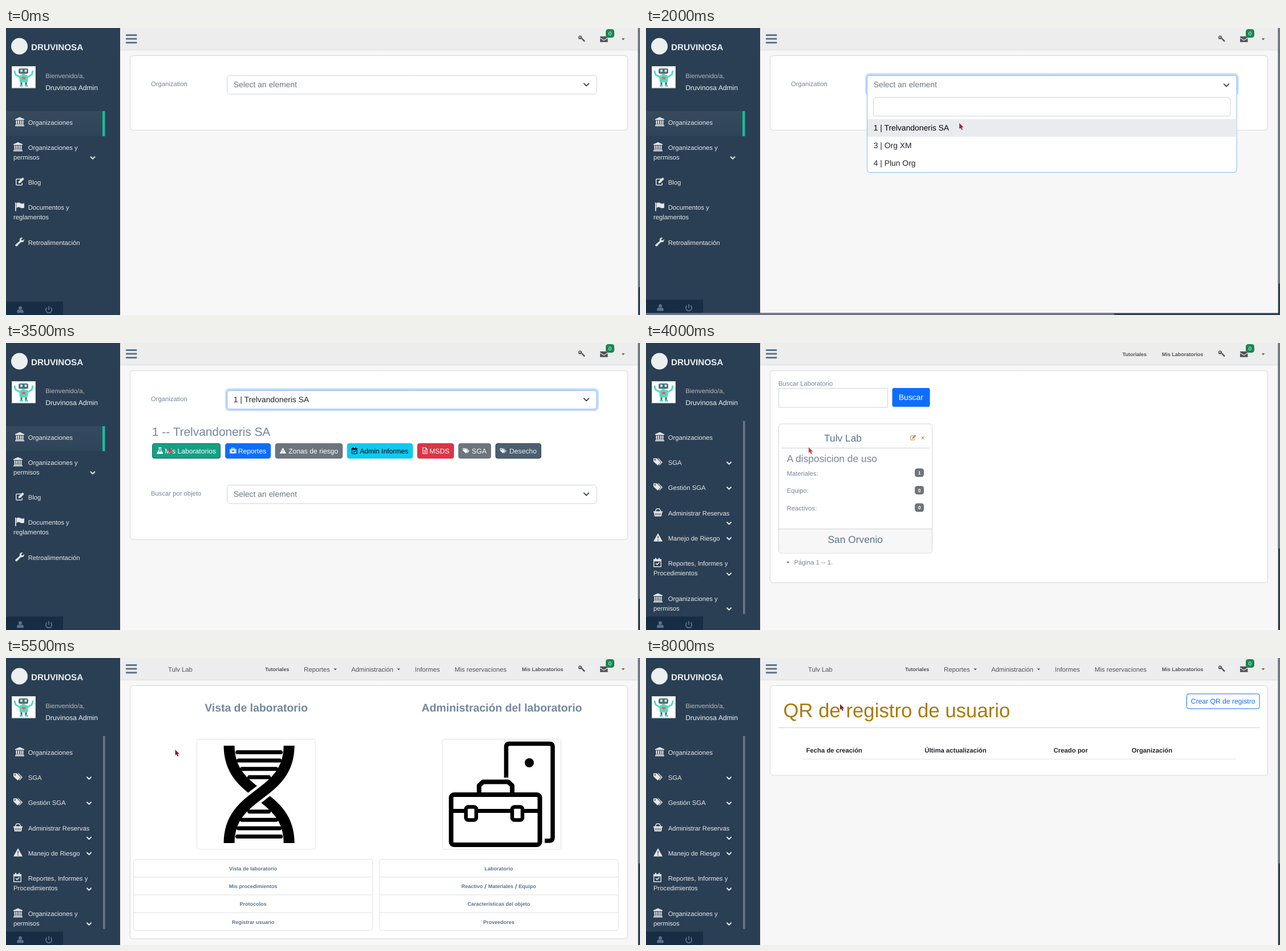
An HTML page with a canvas for the animation above (9 s loop, 1111 px wide and 504 px high).

```html
<!DOCTYPE html>
<html lang="es">
<head>
<meta charset="utf-8">
<title>Panel de laboratorio</title>
<style>
  html, body { margin: 0; width: 100%; height: 100%; overflow: hidden; background: #2a3f54; }
  canvas { display: block; }
</style>
</head>
<body>
<canvas id="stage" width="1111" height="504"></canvas>
<script>
const W = 1111, H = 504, LOOP = 9000;
const ctx = document.getElementById('stage').getContext('2d');

const NAVY = '#2a3f54', SLATE = '#73879c', LINK = '#5a738e', HOVER = '#0a58ca';
const DARK = '#515356', INK = '#212529', LINE = '#d4d4d4', FIELD = '#ced4da';
const BLUE = '#0d6efd', GREY = '#6c757d', PALE = '#e7e7e7', THUMB = '#717486';

// Text sizes in use
const TINY = 9, SMALL = 11.28, MEDIUM = 12.15, BASE = 13.89, LARGE = 17.36;

const BRAND = 'DRUVINOSA', USER = 'Druvinosa Admin', LAB = 'Tulv Lab', PLACE = 'San Orvenio';
const ORGS = ['1 | Trelvandoneris SA', '3 | Org XM', '4 | Plun Org'];
const ORG_TITLE = '1 -- Trelvandoneris SA';

// Icons are drawn in a 16 x 16 box
const icons = {
  bank: 'M8 0L16 3.5V5H0V3.5Z M1.5 6h2.2v6H1.5z M5 6h2.2v6H5z M8.8 6H11v6H8.8z M12.3 6h2.2v6h-2.2z M1 12.5h14v1.2H1z M0 14.3h16V16H0z',
  edit: 'M11 3H3Q1 3 1 5V13Q1 15 3 15H11Q13 15 13 13V10.5H11.5V13.5H2.5V4.5H10Z M6 8L13 1L15.8 3.8L8.8 10.8L5.5 11.3Z',
  flag: 'M0 1h1.8v15H0z M2.5 2Q6 0 9 2T16 2V10Q12 12 9 10T2.5 10.5Z',
  wrench: 'M.5 13L8 6.5Q7 3 9.5 1.2Q11 .2 13.5 .8L10.8 3.2L11.3 5.2L13.3 5.7L15.8 3Q16.3 6 14.5 7.8Q12.5 9.3 10 8.6L3.5 15.5Q2 16.5 .8 15.3T.5 13Z',
  tags: 'M0 2H6L13 9L7.5 14.5L0 7.5Z M7.7 2H9.2L16 9L10.5 14.5L9.7 13.7L14 9Z M2.8 3.4a1.3 1.3 0 1 0 .01 0Z',
  basket: 'M0 6H16V8H15L14 15H2L1 8H0Z M3.8 9h1.4v4H3.8z M7.3 9h1.4v4H7.3z M10.8 9h1.4v4h-1.4z M2.5 6L5 1H11L13.5 6H12L10.2 2.4H5.8L4 6Z',
  warn: 'M8 .5L16 15H0Z M7.2 5.5H8.8L8.5 10.5H7.5Z M7.2 11.7h1.6v1.6H7.2z',
  calendar: 'M0 2H14V16H0Z M1.4 6V14.6H12.6V6Z M3 0h2v2H3z M9 0h2v2H9z M3.5 10L4.7 8.8L6.3 10.4L9.8 7L11 8.2L6.3 12.8Z',
  user: 'M8 .5a3.7 4 0 1 0 .01 0Z M1 15V12Q1 8.5 4.5 8Q8 10.5 11.5 8Q15 8.5 15 12V15Z',
  key: 'M5 1a4 4 0 1 0 .01 0Z M4.5 3a1.5 1.5 0 1 0 .01 0Z M8 6.5L9.3 5.8L15.5 12L15 14L13.5 14.5L12.5 12.8L11 13V11L9 10.5Z',
  mail: 'M0 2H16V4L8 9.5L0 4Z M0 6L8 11L16 6V14H0Z',
  flask: 'M4.5 0h7v1.6h-1V6L15.5 14Q16 16 14 16H2Q0 16 .5 14L5.5 6V1.6h-1z M7 1.6V6.5L4.8 10H11.2L9 6.5V1.6z',
  kit: 'M0 4H4V2Q4 1 5 1H11Q12 1 12 2V4H16V15H0Z M5.5 4H10.5V2.5H5.5Z M7 6.5h2v2h2v2H9v2H7v-2H5v-2h2z M2.2 4v11h.9V4z M12.9 4v11h.9V4z',
  doc: 'M2 0H10L14 4V16H2Z M3.4 1.4V14.6H12.6V5H9V1.4Z M5 7h6v1.2H5z M5 9.5h6v1.2H5z M5 12h6v1.2H5z',
  cross: 'M3 1L8 6L13 1L15 3L10 8L15 13L13 15L8 10L3 15L1 13L6 8L1 3Z'
};
for (const name in icons) icons[name] = new Path2D(icons[name]);
const arrow = new Path2D('M0 0V10L2.2 8.2L4.2 12L6 11L4.2 7.5H7.5Z');

function text(str, x, y, size, color, { bold = false, align = 'left' } = {}) {
  ctx.font = `${bold ? 'bold ' : ''}${size}px "Liberation Sans", Arial, sans-serif`;
  ctx.textAlign = align;
  ctx.fillStyle = color;
  ctx.fillText(str, x, y);
}

function rect(x, y, w, h, color) {
  ctx.fillStyle = color;
  ctx.fillRect(x, y, w, h);
}

function box(x, y, w, h, r, fill, border, width = 1) {
  ctx.beginPath();
  ctx.roundRect(x, y, w, h, r);
  if (fill) { ctx.fillStyle = fill; ctx.fill(); }
  if (border) { ctx.strokeStyle = border; ctx.lineWidth = width; ctx.stroke(); }
}

function disc(x, y, r, color) {
  ctx.fillStyle = color;
  ctx.beginPath();
  ctx.arc(x, y, r, 0, Math.PI * 2);
  ctx.fill();
}

function stroke(d, color, width, cap = 'butt') {
  ctx.strokeStyle = color;
  ctx.lineWidth = width;
  ctx.lineCap = cap;
  ctx.lineJoin = 'round';
  ctx.stroke(new Path2D(d));
}

function icon(name, x, y, size, color) {
  ctx.save();
  ctx.translate(x, y);
  ctx.scale(size / 16, size / 16);
  ctx.fillStyle = color;
  ctx.fill(icons[name], 'evenodd');
  ctx.restore();
}

const chevron = (x, y, r, color, width) =>
  stroke(`M${x - r} ${y - r / 2}L${x} ${y + r / 2}L${x + r} ${y - r / 2}`, color, width, 'round');

const caret = (x, y) => {
  ctx.fillStyle = DARK;
  ctx.fill(new Path2D(`M${x - 2.8} ${y}h5.6l-2.8 3z`));
};

const panel = bottom => box(217.5, 48.5, 872, bottom - 48.5, 5, '#fff', LINE);

function robot() {
  const teal = '#4fdcbf', steel = '#4c7078';
  rect(10, 67, 42, 38.5, '#fff');
  stroke('M10.5 67.5h41v37.5h-41z', '#c9d3d8', 1);
  stroke('M24 86L17 82L15 76M38 86L45 82L47 76', teal, 3, 'round');
  stroke('M27 95V101M35 95V101', steel, 3);
  rect(24, 100, 5.5, 3, teal);
  rect(33, 100, 5.5, 3, teal);
  box(22, 71, 17, 9.5, 3, steel);
  disc(27, 75, 2.2, '#bff5e8');
  disc(34.5, 75, 2.2, '#bff5e8');
  rect(28, 80.5, 5, 2.5, '#9ab');
  box(23.5, 82.5, 15, 13, 3, teal);
  box(28, 86, 6, 4, 1, '#e8605a');
}

const homeMenu = [
  ['bank', 16, 166, 'Organizaciones'],
  ['bank', 13, 210, 'Organizaciones y', 'permisos', 152, 228],
  ['edit', 16, 271, 'Blog'],
  ['flag', 16, 315, 'Documentos y', 'reglamentos'],
  ['wrench', 16, 377, 'Retroalimentación']
];
const labMenu = [
  ['bank', 16, 166, 'Organizaciones'],
  ['tags', 13, 210, 'SGA', '', 145.5, 211],
  ['tags', 13, 254, 'Gestión SGA', '', 145.5, 255],
  ['basket', 13, 299, 'Administrar Reservas', '', 145.5, 316.5],
  ['warn', 13, 343, 'Manejo de Riesgo', '', 145.5, 343.5],
  ['calendar', 13, 387, 'Reportes, Informes y', 'Procedimientos', 145.5, 406],
  ['bank', 13, 449, 'Organizaciones y', 'permisos', 145.5, 467]
];

function sidebar(inLab, footY) {
  rect(0, 0, 200, H, NAVY);
  disc(23.5, 32, 14.5, '#ecf0f1');
  text(BRAND, 44, 39, 15.2, '#ecf0f1', { bold: true });
  robot();
  text('Bienvenido/a,', 69.3, 88, SMALL, '#bab8b8');
  text(USER, 69.3, 108.5, MEDIUM, '#ecf0f1');

  if (inLab) {
    rect(170, 137, 3.6, 339, THUMB);
  } else {
    const g = ctx.createLinearGradient(0, 146, 0, 190);
    g.addColorStop(0, '#364a5c');
    g.addColorStop(1, '#2e4459');
    rect(0, 146, 173.5, 44, g);
    rect(169, 146, 4.5, 44, '#1abb9c');
  }
  for (const [name, x, y, label, second, cx, cy] of inLab ? labMenu : homeMenu) {
    icon(name, x, y - 9.5, 16, PALE);
    text(label, 38.7, y + 4, SMALL, PALE);
    if (second) text(second, 13, y + 21, SMALL, PALE);
    if (cx) chevron(cx, cy, 3.5, PALE, 2);
  }

  rect(0, footY, 100, H - footY, '#172d44');
  icon('user', 18.5, footY + 7.5, 13, LINK);
  const py = footY + 14.5;
  stroke(`M71.7 ${py - 4}A5.2 5.2 0 1 0 78.3 ${py - 4}M75 ${py - 6.5}V${py}`, LINK, 1.8);
}

function topbar(screen) {
  rect(200, 0, 908, 39, '#ededed');
  rect(200, 38.2, 908, 1, '#d9dee4');
  for (let i = 0; i < 3; i++) box(210, 11 + i * 6.6, 19.5, 3, 1, LINK);
  icon('key', 1002, 12.5, 13, DARK);
  icon('mail', 1041, 13, 13.5, DARK);
  box(1051, 2, 15, 15, 4.5, '#198754');
  text('0', 1058.5, 12.8, 9.5, '#fff', { align: 'center' });
  caret(1081.5, 18.3);
  if (screen === 'home') return;

  const inLab = screen !== 'labs';
  text('Tutoriales', inLab ? 454 : 835, 23.3, TINY, DARK, { bold: true });
  text('Mis Laboratorios', 904, 23.3, TINY, DARK, { bold: true });
  if (!inLab) return;
  const items = [[LAB, 284], ['Reportes', 522], ['Administración', 605], ['Informes', 716.5], ['Mis reservaciones', 786.3]];
  for (const [label, x] of items) text(label, x, 23.5, SMALL, DARK);
  caret(577, 18.5);
  caret(688, 18.5);
}

function select(y, value, { chosen = false, focus = false, open = false } = {}) {
  if (focus) box(385.8, y - 1.8, 651, 36.5, 6, null, 'rgba(13,110,253,.25)', 3.5);
  box(387.5, y + .5, 647.5, 32.5, 5, '#fff', focus ? '#86b7fe' : FIELD);
  text(value, 398.7, y + 21.3, BASE, chosen ? INK : GREY);
  chevron(1017, y + (open ? 17.5 : 16.5), 4.3, '#343a40', 1.7);
}

function dropdown() {
  box(387.5, 113, 647.5, 140.5, [0, 0, 4, 4], '#fff', '#86b7fe');
  rect(388, 111, 646.5, 6, '#fff');
  box(398.5, 122, 625.5, 32.5, 4, '#fff', FIELD);
  rect(388, 160, 646.5, 31, '#e9ecef');
  ORGS.forEach((org, i) => text(org, 398.7, 179.8 + i * 31.2, BASE, i ? INK : '#000'));
}

const actions = [
  ['flask', 'Mis Laboratorios', 256, 376, '#26b99a', '#169f85'],
  ['kit', 'Reportes', 384, 464, BLUE, BLUE],
  ['warn', 'Zonas de riesgo', 471.5, 590, GREY, GREY],
  ['calendar', 'Admin Informes', 597.5, 713, '#0dcaf0', '#0dcaf0', '#000'],
  ['doc', 'MSDS', 720.5, 785, '#dc3545', '#dc3545'],
  ['tags', 'SGA', 792.5, 850, GREY, GREY],
  ['tags', 'Desecho', 857.5, 938, '#4b5f71', '#364b5f', '#e9edef']
];

function home(t) {
  const chosen = t >= 2500, open = t >= 1000 && !chosen;
  panel(chosen ? 345 : 179.5);
  text('Organization', 254, 102, SMALL, SLATE);
  select(83, chosen ? ORGS[0] : 'Select an element', { chosen, open, focus: t >= 1000 });
  if (open) dropdown();
  if (!chosen) return;

  text(ORG_TITLE, 256, 163.3, 20.83, SLATE);
  actions.forEach(([name, label, x, right, fill, border, color = '#fff'], i) => {
    const hover = i === 0 && t >= 3500;
    box(x + .5, 176.5, right - x - 1, 26, 3.5, hover ? '#169f85' : fill, hover ? '#11705d' : border);
    icon(name, x + 8, 183.3, 11.5, color);
    text(label, right - 8, 193.6, MEDIUM, color, { align: 'right' });
  });
  text('Buscar por objeto', 254, 268, SMALL, SLATE);
  select(249, 'Select an element');
}

function labs(t) {
  panel(421);
  text('Buscar Laboratorio', 232, 75, SMALL, SLATE);
  box(232.5, 79.5, 191, 33.5, 0, '#fff', FIELD);
  box(431.5, 79, 66, 33, 3, BLUE);
  text('Buscar', 464.3, 100.2, BASE, '#fff', { align: 'center' });

  box(232.5, 142, 269, 227, 5, '#fff', LINE);
  box(233, 326.5, 268, 42, [0, 0, 5, 5], '#f7f7f7');
  rect(233, 326, 268, 1, LINE);
  text(LAB, 345, 172.8, LARGE, t >= 5000 ? HOVER : LINK, { align: 'center' });
  icon('edit', 462.5, 160.5, 11, '#cb8546');
  icon('cross', 482, 163.5, 6, '#cb8546');
  rect(238, 184, 258, 1, '#cdd0d4');
  text('A disposicion de uso', 246.7, 209.3, LARGE, SLATE);
  [['Materiales:', 1], ['Equipo:', 0], ['Reactivos:', 0]].forEach(([label, count], i) => {
    const y = 232.8 + i * 30.6;
    text(label, 246.7, y, SMALL, SLATE);
    box(471, y - 12.5, 16, 15, 4.5, GREY);
    text(count, 479, y - 1.7, 8.5, '#fff', { bold: true, align: 'center' });
  });
  text(PLACE, 366.7, 350.6, LARGE, LINK, { align: 'center' });
  disc(248.8, 385, 1.8, SLATE);
  text('Página 1 -- 1.', 259.5, 389, SMALL, SLATE);
}

function dna() {
  const front = 'M496 154C496 245 391 234 391 325';
  stroke('M391 154C391 245 496 234 496 325', '#000', 19);
  ctx.save();
  ctx.beginPath();
  ctx.rect(380, 222, 127, 35);
  ctx.clip();
  stroke(front, '#fff', 28);
  ctx.restore();
  stroke(front, '#000', 19);
  [38, 36, 30, 17].forEach((half, i) => {
    for (const y of [165.5 + i * 14.6, 313.5 - i * 14.6])
      stroke(`M${443.5 - half} ${y}H${443.5 + half}`, '#000', 7, 'round');
  });
}

function toolbox() {
  stroke('M876.5 210V156Q876.5 150.5 882 150.5H952.5Q958 150.5 958 156V315Q958 321 952 321H944', '#000', 7.5);
  disc(917, 184, 8, '#000');
  stroke('M829 236V224L836 217.5H880L887 224V236', '#000', 8);
  box(780, 240, 155.5, 88, 5, '#fff', '#000', 8);
  stroke('M780 268.5H935', '#000', 7);
  for (const x of [806, 887]) box(x, 261.5, 18, 23, 4, '#fff', '#000', 6.5);
}

function listBox(x, center, rows) {
  box(x, 353.5, 419, 125, 5, '#fff', '#dcdfe2');
  rows.forEach((row, i) => {
    const y = 353.5 + i * 31.25;
    if (i) rect(x, y - .5, 419, 1, '#dcdfe2');
    const [label, color = LINK] = row;
    if (label) text(label, center, y + 19.4, TINY, color, { bold: true, align: 'center' });
  });
}

function lab(t) {
  panel(493);
  text('Vista de laboratorio', 438.5, 94, 19.4, SLATE, { bold: true, align: 'center' });
  text('Administración del laboratorio', 868.8, 94, 19.4, SLATE, { bold: true, align: 'center' });
  box(334.5, 142.5, 207.5, 193.5, 4, '#fff', '#dee2e6');
  box(765, 142.5, 207.5, 193.5, 4, '#fff', '#dee2e6');
  dna();
  toolbox();
  listBox(223.5, 433, [['Vista de laboratorio'], ['Mis procedimientos'], ['Protocolos'],
    ['Registrar usuario', t >= 6500 ? HOVER : LINK]]);
  listBox(654.2, 863.5, [['Laboratorio'], [''], ['Características del objeto'], ['Proveedores']]);
  [['Reactivo', 798], ['Materiales', 845], ['Equipo', 898.3]].forEach(([label, x]) =>
    text(label, x, 404.2, TINY, LINK, { bold: true }));
  text('/', 838.8, 404.8, SMALL, INK);
  text('/', 892.2, 404.8, SMALL, INK);
}

function register() {
  panel(206);
  text('QR de registro de usuario', 240.5, 104, 34.72, '#a87b0c');
  rect(232, 121.7, 843.5, 1.2, '#d5d5d5');
  box(947.5, 63, 127.5, 26, 3.5, '#fff', BLUE);
  text('Crear QR de registro', 1011.2, 80.2, MEDIUM, BLUE, { align: 'center' });
  [['Fecha de creación', 280.7], ['Última actualización', 488.3], ['Creado por', 714.2], ['Organización', 851]]
    .forEach(([label, x]) => text(label, x, 166, SMALL, INK, { bold: true }));
  rect(275, 177, 758, 1, '#dee2e6');
}

const screens = [[7000, 'register', register], [5500, 'lab', lab], [4000, 'labs', labs], [0, 'home', home]];

// Start time, x, y, colour, optional lower edge of the visible part
const pointers = [
  [8000, 340, 81, '#842029'],
  [7000, 414, 459, '#a8323c'],
  [6500, 414, 459, '#9c5a62'],
  [5000, 296.5, 161, '#842029'],
  [3500, 285, 183, '#dc3545'],
  [2500, 549, 167, '#dc3545', 177],
  [2000, 549, 167, '#a8222f'],
  [500, 549, 92, '#a8222f']
];

function pointer(t) {
  const hit = pointers.find(p => t >= p[0]);
  if (!hit) return;
  const [, x, y, color, edge = H] = hit;
  ctx.save();
  ctx.beginPath();
  ctx.rect(0, 0, W, edge);
  ctx.clip();
  ctx.translate(x, y);
  ctx.fillStyle = color;
  ctx.fill(arrow);
  ctx.restore();
}

function scrollbars(t, wide) {
  const end = t < 1000 ? 455 : t < 4000 ? 449 : 361;
  rect(1107.6, 0, 3.4, H, NAVY);
  rect(1107.6, 0, 3.4, end, THUMB);
  if (!wide) return;
  rect(0, 500.5, W, 3.5, NAVY);
  rect(0, 500.5, 820.5, 3.5, THUMB);
}

function draw(t) {
  const [, name, page] = screens.find(s => t >= s[0]);
  const wide = t >= 1000 && t < 2500;
  rect(0, 0, W, H, '#f7f7f7');
  sidebar(name !== 'home', wide ? 477 : 480.5);
  topbar(name);
  page(t);
  scrollbars(t, wide);
  pointer(t);
}

ctx.textRendering = 'geometricPrecision';
const start = performance.now();
function tick() {
  draw((performance.now() - start) % LOOP);
  requestAnimationFrame(tick);
}
tick();
</script>
</body>
</html>
```
